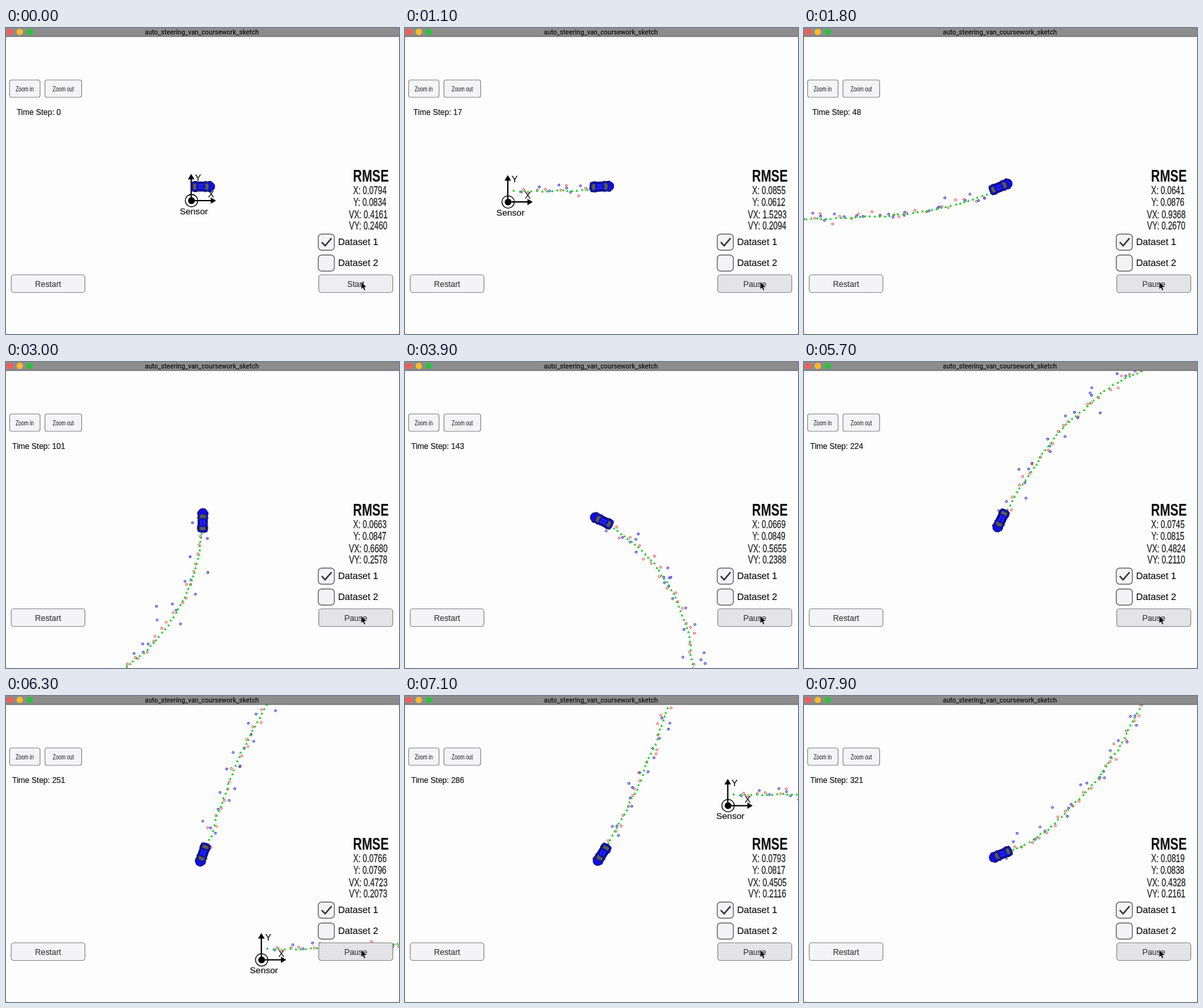
Recreate the animation shown at these times as an HTML page with a canvas. Size 600 by 468 pixels, loop 8 s.

```html
<!DOCTYPE html>
<html lang="en">
<head>
<meta charset="utf-8">
<title>Tracking simulator</title>
<style>
html, body { margin: 0; width: 100%; height: 100%; overflow: hidden; background: #fefdfe; }
canvas, svg { position: absolute; left: 0; top: 0; width: 600px; height: 468px; }
text { font-family: "Liberation Sans", Arial, sans-serif; fill: #111; stroke: #111; stroke-width: .15; }
.mid { text-anchor: middle; }
.title { font: 500 10.1px Roboto, sans-serif; fill: #161616; stroke: none; }
.btn { fill: #f4f4f6; stroke: #8c8c8e; stroke-width: 1.2; }
.box { fill: #f3f3f5; stroke: #6a6a6c; stroke-width: 1.4; }
.cap { font-size: 12.4px; fill: #3c3c3c; stroke: #3c3c3c; }
.zoom { font-size: 10.8px; fill: #333; stroke: #333; }
.num { font-size: 16.4px; fill: #262626; stroke: #262626; stroke-width: .3; }
.opt { font-size: 14.3px; }
</style>
</head>
<body>
<canvas id="trail" width="600" height="468"></canvas>
<svg viewBox="0 0 600 468">
  <g id="sensor" fill="#000">
    <circle r="9.5" fill="none" stroke="#000" stroke-width="1.3"/>
    <circle r="5.2"/>
    <path d="M-.5 -5V-35M5 0H31" stroke="#000" stroke-width="2"/>
    <path d="M-.5 -41L4.5 -32.5H-5.5ZM37.5 0L29.5 -4.8V4.8Z"/>
    <text class="mid" x="10" y="-30" font-size="14">Y</text>
    <text class="mid" x="30" y="-5" font-size="14">X</text>
    <text class="mid" x="3.5" y="20.5" font-size="13.6">Sensor</text>
  </g>

  <g id="car">
    <path d="M-13.5 -7.8H-8.5M9 -7.8H13.5M-13.5 7.8H-8.5M9 7.8H13.5" stroke="#111" stroke-width="1.2"/>
    <path d="M3.4 -8.6L5 -7M3.4 8.6L5 7" stroke="#0a0a70" stroke-width="1.3"/>
    <path d="M-16 -7.3Q-18 -6 -18 0T-16 7.3Q-2 6.9 11 7.5Q18.4 6 18.4 0T11 -7.5Q-2 -6.9 -16 -7.3Z"
      fill="#0f0fe4" stroke="#08085a" stroke-width="1"/>
    <path d="M2.5 -5.2Q8 -5.7 9 -4.4Q10.6 0 9 4.4Q8 5.7 2.5 5.2Q4.4 0 2.5 -5.2Z" fill="#55575c" stroke="#14143c" stroke-width=".8"/>
    <path d="M-9 -4.4L-14.5 -5.2Q-16.4 0 -14.5 5.2L-9 4.4Q-10.4 0 -9 -4.4Z" fill="#5c5e58" stroke="#14143c" stroke-width=".8"/>
    <path d="M-8 -5.7H1.5M-8 5.7H1.5" stroke="#0a0a50" stroke-width="1.1"/>
    <path d="M-7 -2.2H1M-7 2.2H1" stroke="#3c50ff" stroke-width=".9"/>
  </g>

  <rect width="600" height="13" fill="#8d8d8d"/>
  <rect y="12.5" width="600" height="1" fill="#555"/>
  <circle cx="6" cy="6" r="4.8" fill="#fc5b55"/>
  <circle cx="21" cy="6" r="4.8" fill="#fdbb2d"/>
  <circle cx="36" cy="6" r="4.8" fill="#2ac33c"/>
  <text class="title mid" x="299" y="9.5">auto_steering_van_coursework_sketch</text>

  <rect class="btn" x="5.5" y="79.5" width="46.5" height="26.5" rx="3"/>
  <rect class="btn" x="59.5" y="79.5" width="56" height="26.5" rx="3"/>
  <text class="zoom mid" transform="translate(28.5 97) scale(.71 1)">Zoom in</text>
  <text class="zoom mid" transform="translate(87.5 97) scale(.71 1)">Zoom out</text>
  <text class="mid" id="step" x="50" y="132.5" font-size="12"></text>

  <text class="mid" transform="translate(557 234.5) scale(.73 1)" font-size="25.8" font-weight="bold">RMSE</text>
  <g id="errors">
    <text class="num mid" transform="translate(555.5 254) scale(.73 1)"></text>
    <text class="num mid" transform="translate(555.5 272.3) scale(.73 1)"></text>
    <text class="num mid" transform="translate(553 291) scale(.73 1)"></text>
    <text class="num mid" transform="translate(553 308.3) scale(.73 1)"></text>
  </g>

  <rect class="box" x="476.7" y="315.2" width="24.6" height="24.6" rx="5"/>
  <rect class="box" x="476.7" y="347.2" width="24.6" height="24.6" rx="5"/>
  <path d="M482 327.5L487.2 333L497 321.5" fill="none" stroke="#333" stroke-width="2.3"/>
  <text class="opt" x="507" y="332">Dataset 1</text>
  <text class="opt" x="507" y="364">Dataset 2</text>

  <rect class="btn" x="8" y="377.5" width="112.5" height="27" rx="4"/>
  <rect class="btn" id="run" x="477.5" y="377.5" width="113" height="27" rx="4"/>
  <text class="cap mid" x="64.3" y="395.5">Restart</text>
  <text class="cap mid" id="runText" x="534" y="395.5"></text>
  <path d="M542.3 388V399.6L545 397.2L546.8 401.4L548.8 400.5L547 396.5H550.5Z" fill="#000" stroke="#fff" stroke-width=".5"/>
</svg>
<script>
const LOOP = 8000, TICK = 100, START = 800;
const CX = 300, CY = 242, DROP = 4, SCALE = 28.5, DT = 0.05;
const LABELS = ['X', 'Y', 'VX', 'VY'];
const IDLE = [0.0794, 0.0834, 0.4161, 0.2460];
// time, step, RMSE of x, y, vx, vy
const LOG = [
  [700, 0, 0.3, 0.05, 6.2, 0.3],
  [1800, 48, 0.0641, 0.0876, 0.9368, 0.2670],
  [3000, 101, 0.0663, 0.0847, 0.6680, 0.2578],
  [3900, 143, 0.0669, 0.0849, 0.5655, 0.2388],
  [5000, 192, 0.0722, 0.0845, 0.4990, 0.2173],
  [6300, 251, 0.0766, 0.0796, 0.4723, 0.2073],
  [7900, 321, 0.0819, 0.0838, 0.4328, 0.2161]
];

const byId = id => document.getElementById(id);
const ctx = byId('trail').getContext('2d');
const errors = byId('errors').children;

let seed = 20177;
const rand = () => (seed = (seed * 16807) % 2147483647) / 2147483647;
const gauss = () => Math.sqrt(-2 * Math.log(rand())) * Math.cos(2 * Math.PI * rand());

// Figure-eight drive: sinusoidal yaw rate, slightly varying speed.
function drive(count) {
  const path = [];
  let x = 0.6, y = 0.6, yaw = 0, ex = -0.29, ey = -0.02;
  for (let i = 0; i <= count; i++) {
    const laser = i % 2 === 0, phase = 2 * Math.PI * (i + 1) / 500;
    const range = Math.hypot(x, y), bearing = Math.atan2(y, x);
    let mx, my;
    if (laser) {
      mx = x + 0.13 * gauss();
      my = y + 0.13 * gauss();
    } else {
      const r = range + 0.3 * gauss(), b = bearing + 0.03 * gauss();
      mx = r * Math.cos(b);
      my = r * Math.sin(b);
    }
    path.push({ x, y, yaw, laser, mx, my, gx: x + ex, gy: y + ey });
    ex = 0.8 * ex + 0.025 * gauss();
    ey = 0.8 * ey + 0.025 * gauss();
    const v = 5 + 0.2 * Math.cos(2 * phase);
    x += v * DT * Math.cos(yaw);
    y += v * DT * Math.sin(yaw);
    yaw += 0.55 * Math.sin(phase) * DT;
  }
  return path;
}
const path = drive(330);

function stateAt(t) {
  if (t < START) return { step: 0, rmse: IDLE };
  let i = 1;
  while (i < LOG.length - 1 && t > LOG[i][0]) i++;
  const a = LOG[i - 1], b = LOG[i], k = (t - a[0]) / (b[0] - a[0]);
  const step = Math.round(a[1] + (b[1] - a[1]) * k);
  const root = n => Math.sqrt(Math.max(n, 1));
  const rmse = LABELS.map((_, j) => {
    const p = a[j + 2] * root(a[1]), q = b[j + 2] * root(b[1]);
    return (p + (q - p) * k) / root(step);
  });
  return { step, rmse };
}

function ring(x, y, laser) {
  ctx.strokeStyle = laser ? '#e23434' : '#1c1ccc';
  ctx.beginPath();
  ctx.arc(x, y, 1.6, 0, 2 * Math.PI);
  if (!laser) {
    ctx.moveTo(x, y);
    ctx.lineTo(x + 1.2, y - 1.2);
  }
  ctx.stroke();
}

function triangle(x, y) {
  ctx.beginPath();
  ctx.moveTo(x, y - 2.1);
  ctx.lineTo(x + 2, y + 1.7);
  ctx.lineTo(x - 2, y + 1.7);
  ctx.fill();
}

function draw(t) {
  const { step, rmse } = stateAt(t), car = path[step], running = t >= START;
  const sx = x => CX + (x - car.x) * SCALE;
  const sy = y => CY + DROP + (car.y - y) * SCALE;

  ctx.clearRect(0, 0, 600, 468);
  ctx.lineWidth = 1;
  ctx.fillStyle = '#16cc1c';
  const past = path.slice(0, step);
  past.forEach(p => ring(sx(p.mx), sy(p.my), p.laser));
  past.forEach(p => triangle(sx(p.gx), sy(p.gy)));

  byId('sensor').setAttribute('transform', `translate(${sx(0) + 0.3} ${sy(0) + 0.9})`);
  byId('car').setAttribute('transform', `translate(${CX + 0.3} ${CY + 0.5}) rotate(${-car.yaw * 180 / Math.PI})`);
  byId('step').textContent = 'Time Step: ' + step;
  rmse.forEach((v, i) => errors[i].textContent = `${LABELS[i]}: ${v.toFixed(4)}`);
  byId('runText').textContent = running ? 'Pause' : 'Start';
  byId('run').style.fill = running ? '#e4e4e6' : '#eeeef0';
}

let shown = -1;
const origin = performance.now();
function frame() {
  const t = Math.floor((performance.now() - origin) % LOOP / TICK) * TICK;
  if (t !== shown) draw(shown = t);
  requestAnimationFrame(frame);
}
frame();
</script>
</body>
</html>
```
